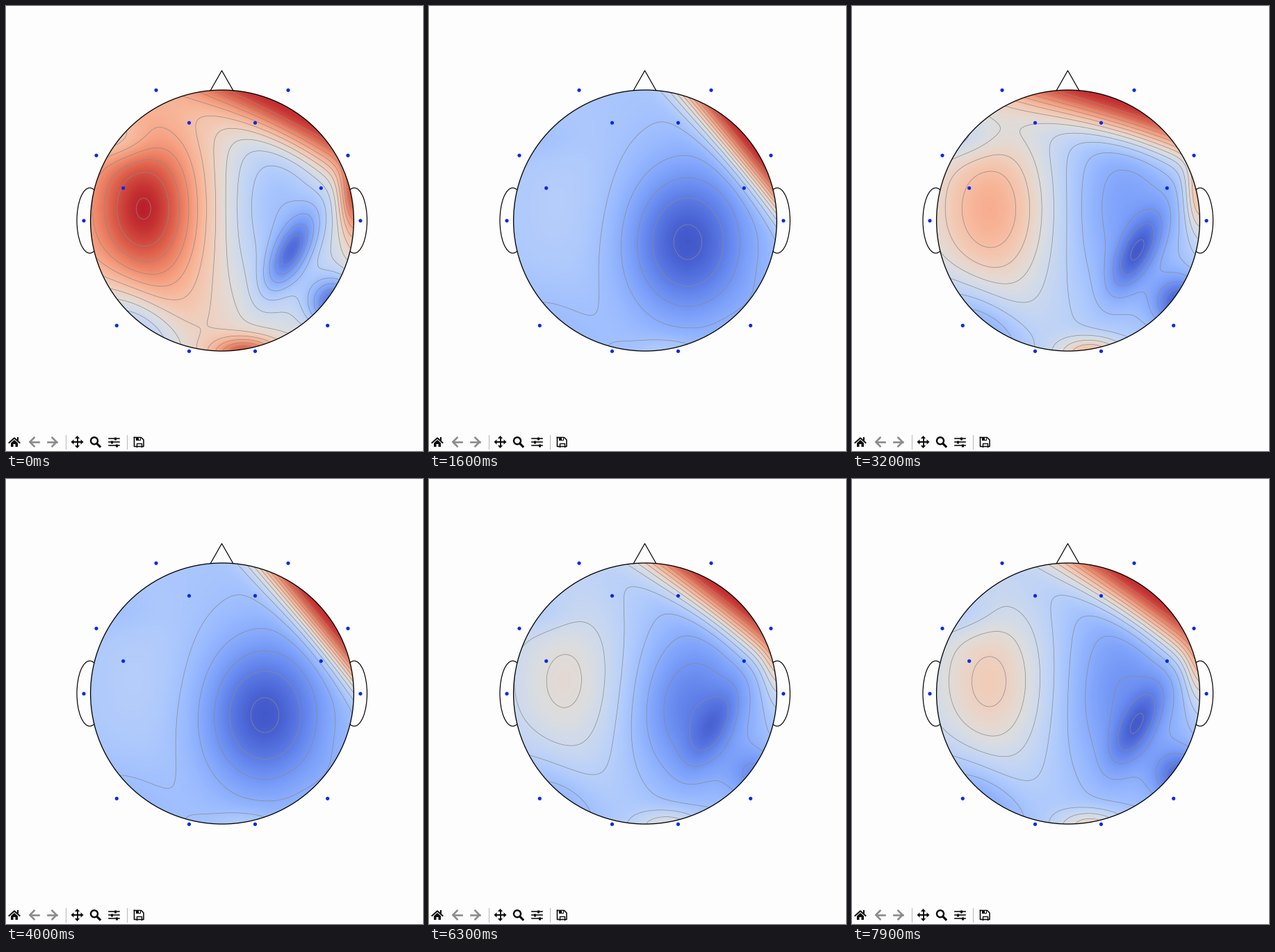
Write a matplotlib script that moves like this. It is 600 px wide and 641 px high and loops after 8 s.

```python
import numpy as np
import matplotlib.pyplot as plt
from matplotlib.animation import FuncAnimation
from matplotlib.patches import Circle, Ellipse, Polygon

W, H, DPI = 600, 641, 100
FRAMES, STEP = 80, 100
CX, CY, RX, RY = 311, 309, 189.4, 188
PX = 72 / DPI
INK, GREY, BLUE = "#0a0a0a", "#8a8a8a", "#0528f0"
LEVELS = np.arange(0.045, 1, 0.066)

# The map swings between a dipole state (mix 0) and a central well (mix 1).
TIMES = [0, 1600, 3200, 4000, 5500, 7000, 7900]
MIX = [0, 1, 0, 1, 0, 1, 0.15]
WARMTH = [0.18, 0, 0, 0, 0.01, 0, -0.04]
AIM = [62, 39, 72, 39, 66, 39, 54]  # direction of the hot rim, degrees

xs = np.arange(119, 504, 2.0)
ys = np.arange(119, 500, 2.0)
gx, gy = np.meshgrid(xs, ys)


def lerp(a, b, t):
    return a + (b - a) * t


def bump(x, y, sx, sy, tilt=0):
    """Gaussian hill of height 1, turned by tilt degrees on screen."""
    c, s = np.cos(np.radians(tilt)), np.sin(np.radians(tilt))
    dx, dy = gx - x, gy - y
    return np.exp(-0.5 * (((c * dx + s * dy) / sx) ** 2
                          + ((c * dy - s * dx) / sy) ** 2))


# Each source: its hill, then its strength in the dipole and central states.
SOURCES = [
    (bump(200, 292, 60, 85), 0.28, 0.04),         # left hot spot
    (bump(395, 290, 70, 125), -0.21, 0),          # right cold field
    (bump(410, 355, 45, 18, -61), -0.21, 0),      # its slanted core
    (bump(372, 340, 65, 80), 0, -0.30),           # central well
    (bump(475, 430, 28, 28), -0.33, -0.02),       # lower right rim
    (bump(500, 265, 14, 45), 0.30, 0),            # right rim
    (bump(345, 500, 32, 16), 0.27, 0.07),         # bottom rim
    (bump(185, 465, 60, 35, 45), -0.20, -0.04),   # lower left rim
    (bump(155, 192, 40, 22), -0.10, -0.03),       # upper left rim
]


def field(ms):
    mix, warmth, aim = (np.interp(ms, TIMES, k) for k in (MIX, WARMTH, AIM))
    gain = 1 + 2 * warmth
    z = lerp(0.42 + warmth, 0.33, mix)
    z = z + gain * sum(lerp(a, b, mix) * hill for hill, a, b in SOURCES)
    # pull the rim facing the aim up to red
    a = np.radians(aim)
    reach = (gx - CX) / RX * np.cos(a) - (gy - CY) / RY * np.sin(a)
    hot = np.exp(-((1 - reach) / lerp(0.25, 0.18, mix)) ** 2)
    return np.clip(lerp(z, 0.96, hot), 0, 1)


fig = plt.figure(figsize=(W / DPI, H / DPI), dpi=DPI, facecolor="#fefdfe")
ax = fig.add_axes([0, 0, 1, 1])
ax.axis("off")


def line(points, width=1.2, color=INK, z=5, **kw):
    x, y = zip(*points)
    ax.plot(x, y, color=color, lw=width * PX, zorder=z, **kw)


def shape(points, color=INK, z=5):
    ax.add_patch(Polygon(points, fc=color, ec="none", zorder=z))


def draw_head():
    for x in (120.5, 501):
        ax.add_patch(Ellipse((x, CY), 37, 94, fc="none", ec="black",
                             lw=1.2 * PX, zorder=1))
    line([(294, 122), (310.5, 93), (327, 122)], 1.2, "black", 1)
    rim = Ellipse((CX, CY), 2 * RX, 2 * RY, fc="none", ec="black",
                  lw=1.3 * PX, zorder=4)
    ax.add_patch(rim)
    for dx, y in ((95, 121), (47.5, 168), (181, 215), (142.3, 262),
                  (199, 309), (151.7, 460), (47.5, 497)):
        for x in (CX - dx, CX + dx):
            ax.add_patch(Circle((x, y + 0.3), 2.6, fc=BLUE, ec="none",
                                zorder=6))
    return rim


def draw_toolbar():
    y = 628
    # home
    line([(4.5, 629), (12, 622.3), (19.5, 629)], 2)
    line([(16.6, 621.5), (16.6, 625)], 2)
    shape([(7, 629.5), (12, 625), (17, 629.5), (17, 635), (13.5, 635),
           (13.5, 631), (10.5, 631), (10.5, 635), (7, 635)])
    # back and forward
    for x, d in ((40, 1), (67, -1)):
        line([(x - 5.5 * d, y), (x + 7 * d, y)], 2.6, GREY)
        line([(x + 0.5 * d, y - 6.2), (x - 5.7 * d, y),
              (x + 0.5 * d, y + 6.2)], 2.6, GREY)
    for x in (85.5, 173.5):
        line([(x, 618), (x, 638)], 1, "#b8b8b8")
    # pan
    x = 102.5
    for dx, dy in ((1, 0), (-1, 0), (0, 1), (0, -1)):
        line([(x, y), (x + 6 * dx, y + 6 * dy)], 2)
        shape([(x + 9 * dx, y + 9 * dy),
               (x + 5 * dx + 3.6 * dy, y + 5 * dy + 3.6 * dx),
               (x + 5 * dx - 3.6 * dy, y + 5 * dy - 3.6 * dx)])
    # zoom
    ax.add_patch(Circle((127, 626.3), 5, fc="none", ec=INK, lw=2.4 * PX))
    line([(131, 630.5), (135, 634.5)], 3.2)
    # sliders
    for ly, knob in ((623, 157), (628, 152), (633, 159)):
        line([(148, ly), (163, ly)], 1.6)
        line([(knob, ly - 2), (knob, ly + 2)], 3, solid_capstyle="butt")
    # save
    line([(184.5, 621.5), (194.5, 621.5), (198, 625), (198, 634.5),
          (184.5, 634.5), (184.5, 621.5)], 1.6)
    shape([(187, 621.5), (194, 621.5), (194, 626), (187, 626)])
    shape([(191, 622.3), (193, 622.3), (193, 625), (191, 625)], "white", 6)
    line([(187.5, 634.5), (187.5, 629.5), (195, 629.5), (195, 634.5)], 1.4)


rim = draw_head()
draw_toolbar()
heat = ax.imshow(field(0), cmap="coolwarm", vmin=0, vmax=1, aspect="auto",
                 interpolation="bilinear", zorder=2,
                 extent=(xs[0] - 1, xs[-1] + 1, ys[-1] + 1, ys[0] - 1))
heat.set_clip_path(rim)
ax.set_xlim(0, W)
ax.set_ylim(H, 0)
ax.autoscale(False)
rings = []


def update(i):
    z = field(i * STEP)
    heat.set_data(z)
    while rings:
        rings.pop().remove()
    lines = ax.contour(xs, ys, z, levels=LEVELS, colors=GREY,
                       linewidths=0.7 * PX, linestyles="solid", zorder=3)
    lines.set_clip_path(rim)
    rings.append(lines)
    return [heat, lines]


anim = FuncAnimation(fig, update, frames=FRAMES, interval=STEP,
                     init_func=lambda: [heat], repeat=True, repeat_delay=0,
                     blit=False)
plt.show()
```
